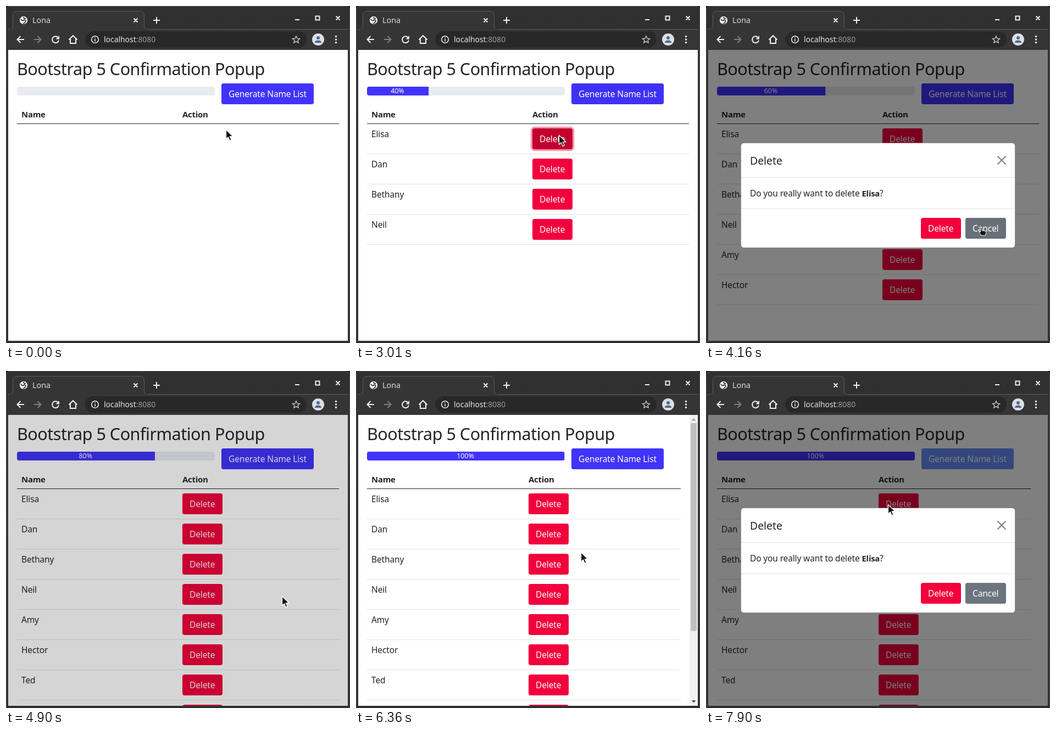
An HTML page for the animation above (8000 ms loop, 626 by 614 pixels).

```html
<!DOCTYPE html>
<html lang="en">
<head>
<meta charset="utf-8">
<title>Confirmation popup</title>
<style>
  html, body { margin: 0; width: 100%; height: 100%; overflow: hidden; background: #232323; }
  svg { display: block; width: 626px; height: 614px; }
  text { font: 15.5px "Noto Sans", "Open Sans", sans-serif; letter-spacing: -.009em; fill: #212529; white-space: pre; }
  .bold { font-weight: 700; font-size: 15px; letter-spacing: -.02em; }
  .light { fill: #fff; }
  .heading { font-size: 30.6px; letter-spacing: -.017em; }
  .title { font-size: 19.4px; letter-spacing: 0; }
  .label { font-size: 12.4px; letter-spacing: 0; text-anchor: middle; fill: #fff; }
  .tab { font-size: 14.3px; letter-spacing: 0; fill: #dcdcdc; }
  .url { font-size: 13.9px; letter-spacing: 0; fill: #e8e8e8; }
  .icon { fill: none; stroke: #f0f0f0; stroke-width: 2; }
</style>
</head>
<body>
<svg viewBox="0 0 626 614">
  <defs>
    <linearGradient id="bar" x2="0" y2="1">
      <stop stop-color="#303030"/><stop offset="1" stop-color="#282828"/>
    </linearGradient>
    <clipPath id="view"><path d="M4 80H622V610H4Z"/></clipPath>
    <clipPath id="track"><rect x="20" y="147" width="360" height="16" rx="4"/></clipPath>
  </defs>

  <g id="browser">
    <path d="M0 0H626V614H0Z" fill="#202020"/>
    <rect x=".5" y=".5" width="625" height="620" rx="7" fill="url(#bar)" stroke="#4c4c4c"/>
    <path d="M2 42H624V80H2Z" fill="#353535"/>
    <path d="M2.5 42.5H6Q12.5 42.5 12.5 36V18Q12.5 9.5 21 9.5H243Q251.5 9.5 251.5 18V36Q251.5 42.5 258 42.5H623.5" fill="#353535" stroke="#5c5c5c"/>
    <path d="M7 43H257" stroke="#353535" stroke-width="2"/>
    <path d="M2.5 80V611.5H623.5V80" fill="none" stroke="#3c3c3c"/>
    <rect x="144" y="46" width="403" height="30" rx="15" fill="#282828"/>
    <circle cx="32" cy="26" r="7.2" fill="#f0f0f0"/>
    <path d="M27 24q3 4 5 2t4 1q-2 5-5 5M32 20q0 3 4 3" fill="none" stroke="#353535" stroke-width="1.8"/>
    <text class="tab" x="48" y="31">Lona</text>
    <path class="icon" d="M232.5 22.5l7 7m0-7l-7 7M268 26h12m-6-6v12M526 25h8M600.500 18.500l7 7m0-7l-7 7"/>
    <path class="icon" d="M563.5 18.5h7v7h-7z"/>
    <path class="icon" d="M33 61H20.5m6-6l-6 6 6 6"/>
    <path class="icon" d="M51 61h12.5m-6-6l6 6-6 6" style="stroke:#808080"/>
    <path class="icon" d="M94.5 57A6 6 0 1 0 96 62.5"/>
    <path d="M97 54v6.5h-6.5z" fill="#f0f0f0"/>
    <path class="icon" d="M114.5 61.5l7.5-7.5 7.5 7.5M117 60v8h10v-8"/>
    <circle class="icon" cx="162" cy="61" r="6.3" style="stroke-width:1.6"/>
    <path class="icon" d="M162 60v4.5m0-7.5v1.6" style="stroke-width:1.6"/>
    <text class="url" x="178" y="66">localhost<tspan fill="#9a9a9a">:8080</tspan></text>
    <path class="icon" d="M528 54.8l1.9 4.3 4.7.4-3.6 3 1.1 4.6-4.1-2.5-4.1 2.5 1.1-4.600-3.600-3 4.700-.400z" style="stroke:#c8c8c8;stroke-width:1.4"/>
    <circle cx="568" cy="61" r="11" fill="#dbe0e6"/>
    <g fill="#53658a"><circle cx="568" cy="58" r="3"/><path d="M562 67q0-4.500 6-4.500t6 4.500z"/></g>
    <g fill="#f0f0f0"><circle cx="600.5" cy="55.5" r="1.7"/><circle cx="600.5" cy="61" r="1.7"/><circle cx="600.5" cy="66.5" r="1.7"/></g>
  </g>

  <g clip-path="url(#view)">
    <path d="M4 80H622V610H4Z" fill="#fff"/>
    <text class="heading" x="20" y="126">Bootstrap 5 Confirmation Popup</text>
    <g clip-path="url(#track)">
      <path d="M20 147H380V163H20Z" fill="#e9ecef"/>
      <rect id="progress" x="20" y="147" height="16" fill="#4133fb"/>
    </g>
    <text id="percent" class="label" y="159"></text>
    <g id="generate"></g>
    <text class="bold" x="28" y="203">Name</text>
    <text class="bold" id="action" y="203">Action</text>
    <rect id="headLine" x="20" y="214" height="1" fill="#212529"/>
    <g id="rows"></g>
    <g id="scrollbar">
      <path d="M607 80H622V610H607Z" fill="#f1f1f1"/>
      <rect id="thumb" x="609" y="95" width="11" fill="#c1c1c1"/>
      <path d="M610.5 90.5h8l-4-4.5z" fill="#a3a3a3"/>
      <path d="M610.5 600h8l-4 4.5z" fill="#505050"/>
    </g>
    <path id="backdrop" d="M4 80H622V610H4Z"/>
    <g id="modal">
      <rect x="63.5" y="249.5" width="499" height="191" rx="5.5" fill="#fff" stroke="#000" stroke-opacity=".25"/>
      <path d="M64 312.5H562M64 369.5H562" stroke="#dee2e6"/>
      <text class="title" x="80" y="289">Delete</text>
      <path class="icon" d="M530.5 273.5l15 15m0-15l-15 15" style="stroke:#7f7f7f"/>
      <text x="80" y="347">Do you really want to delete <tspan class="bold">Elisa</tspan>?</text>
      <g id="modalButtons"></g>
    </g>
  </g>

  <g id="cursor" stroke-linejoin="round">
    <path id="arrow" d="M-.5-.5V16.500l3.900-3.700 2.800 6.500 2.900-1.200-2.800-6.400H12z" fill="#111" stroke="#fff" stroke-width="1.2"/>
    <path id="hand" d="M2.5 1.5Q4-.5 5 2v4l6 1.2q2 .5 1.700 2.500L11.500 15H4L0 9.500Q-.5 7.500 2.500 9z" fill="#111" stroke="#fff"/>
  </g>
</svg>
<script>
const LOOP = 8000;
const RED = [242, 0, 60], DARK_RED = [194, 0, 46];
const BLUE = [65, 51, 251], DARK_BLUE = [56, 43, 228], PALE_BLUE = [102, 143, 253];
const GRAY = [108, 117, 125], DARK_GRAY = [98, 107, 114];
const NAMES = ["Elisa", "Dan", "Bethany", "Neil", "Amy", "Hector", "Ted", "Nora"];
const UPDATES = [1400, 1910, 2420, 2940, 3440, 3990, 4440, 4885, 5390, 5870];
const PATH = [
  [0, 401, 226], [190, 432, 185], [260, 432, 185], [580, 462, 160],
  [2200, 462, 160], [2800, 370, 236], [3300, 370, 236], [3950, 497, 403],
  [4650, 497, 403], [4880, 503, 411], [5650, 503, 411], [6350, 410, 331],
  [6570, 410, 331], [7020, 324, 242], [7420, 324, 242], [7650, 332, 244]
];

const $ = id => document.getElementById(id);
const clamp = v => Math.max(0, Math.min(1, v));
const lerp = (a, b, p) => a + (b - a) * p;
const rgb = (a, b = a, p = 0) => `rgb(${a.map((v, i) => Math.round(lerp(v, b[i], p)))})`;
const show = (el, on) => el.setAttribute("visibility", on ? "inherit" : "hidden");

function set(el, attrs) {
  for (const key in attrs) el.setAttribute(key, attrs[key]);
}

function make(parent, tag, attrs, text = "") {
  const el = document.createElementNS("http://www.w3.org/2000/svg", tag);
  set(el, attrs);
  el.textContent = text;
  return parent.appendChild(el);
}

// CSS-style cubic-bezier timing function
function bezier(x1, y1, x2, y2) {
  const at = (a, b, s) => 3 * a * s * (1 - s) ** 2 + 3 * b * s * s * (1 - s) + s ** 3;
  return p => {
    let lo = 0, hi = 1;
    for (let i = 0; i < 20; i++) {
      const mid = (lo + hi) / 2;
      if (at(x1, x2, mid) < p) lo = mid; else hi = mid;
    }
    return at(y1, y2, lo);
  };
}
const ease = bezier(.25, .1, .25, 1);
const easeOut = bezier(0, 0, .58, 1);

// 0 to 1 after `on`, back to 0 after `off`
const fade = (t, on, off = Infinity, ms = 150) => clamp((t - on) / ms) - clamp((t - off) / ms);

function button(parent, x, y, width, label) {
  const g = make(parent, "g", {});
  const ring = make(g, "rect", { "fill-opacity": .42 });
  const face = make(g, "rect", { x, y, width, height: 38, rx: 4 });
  make(g, "text", { x: x + 13, y: y + 25, class: "light" }, label);
  return (color, ringColor = "none", focus = 0) => {
    const s = 4 * focus;
    set(face, { fill: color });
    set(ring, {
      x: x - s, y: y - s, width: width + 2 * s, height: 38 + 2 * s, rx: 4 + s,
      fill: ringColor
    });
  };
}

const paintGenerate = button($("generate"), 392, 141, 168, "Generate Name List");
button($("modalButtons"), 391, 386, 73, "Delete")(rgb(RED));
const paintCancel = button($("modalButtons"), 472, 386, 74, "Cancel");

const rows = NAMES.map((name, i) => {
  const g = make($("rows"), "g", { transform: `translate(0 ${i * 55})` });
  make(g, "text", { x: 28, y: 239 }, name);
  const line = make(g, "rect", { x: 20, y: 269, height: 1, fill: "#dee2e6" });
  const cell = make(g, "g", {});
  const paint = button(cell, 321, 223, 73, "Delete");
  paint(rgb(RED));
  return { g, line, cell, paint };
});

const starts = [0];
const widthAt = (step, t) =>
  lerp(starts[step], 36 * (step + 1), ease(clamp((t - UPDATES[step]) / 600)));
for (let i = 1; i < UPDATES.length; i++) starts[i] = widthAt(i - 1, UPDATES[i]);

function drawPage(t) {
  const count = UPDATES.filter(u => t >= u).length;
  const width = count ? widthAt(count - 1, t) : 0;
  $("progress").setAttribute("width", width);
  $("percent").setAttribute("x", 19.3 + width / 2);
  $("percent").textContent = count ? `${count * 10}%` : "";

  const narrow = t >= 4955;
  const tableWidth = narrow ? 571 : 586;
  const shift = narrow ? -7 : 0;
  $("action").setAttribute("x", 321 + shift);
  $("headLine").setAttribute("width", tableWidth);
  rows.forEach(({ g, line, cell }, i) => {
    show(g, i < count);
    line.setAttribute("width", tableWidth);
    cell.setAttribute("transform", `translate(${shift} 0)`);
  });
  show($("scrollbar"), narrow && t < 7350);
  $("thumb").setAttribute("height", 500 * 530 / (150 + 55 * Math.max(count, 8)));

  const blue = t < 6390
    ? rgb(BLUE, DARK_BLUE, fade(t, 440, 2900))
    : rgb(BLUE, PALE_BLUE, fade(t, 6390));
  paintGenerate(blue, rgb(BLUE), fade(t, 1370, 2840));
  const hover = fade(t, 2640, 3260) + fade(t, 6880, 7530);
  const focus = fade(t, 2890, 3260) + fade(t, 7260, 7530);
  rows[0].paint(rgb(RED, DARK_RED, hover), rgb(RED), focus);
}

function drawModal(t) {
  $("backdrop").setAttribute("opacity", .5 * (fade(t, 3090, 4800) + fade(t, 7377)));
  const opacity = fade(t, 3245, 4500) + fade(t, 7530);
  const slide = t < 4500 ? easeOut(fade(t, 3245, Infinity, 300))
    : t < 7000 ? 1 - easeOut(clamp((t - 4500) / 300))
    : easeOut(fade(t, 7530, Infinity, 300));
  set($("modal"), { opacity, transform: `translate(0 ${-50 * (1 - slide)})` });
  paintCancel(rgb(GRAY, DARK_GRAY, fade(t, 4100, 4600)), rgb(GRAY), fade(t, 4450, 4700));
}

function drawCursor(t) {
  let i = PATH.length - 1;
  while (t < PATH[i][0]) i--;
  const [t0, x0, y0] = PATH[i], [t1, x1, y1] = PATH[i + 1] || [LOOP, x0, y0];
  const p = (t - t0) / (t1 - t0), s = p * p * (3 - 2 * p);
  $("cursor").setAttribute("transform", `translate(${lerp(x0, x1, s)} ${lerp(y0, y1, s)})`);
  const pointing = t > 3860 && t < 4620;
  show($("hand"), pointing);
  show($("arrow"), !pointing);
}

const begin = performance.now();
function draw() {
  const t = (performance.now() - begin) % LOOP;
  drawPage(t);
  drawModal(t);
  drawCursor(t);
  requestAnimationFrame(draw);
}
draw();
</script>
</body>
</html>
```
